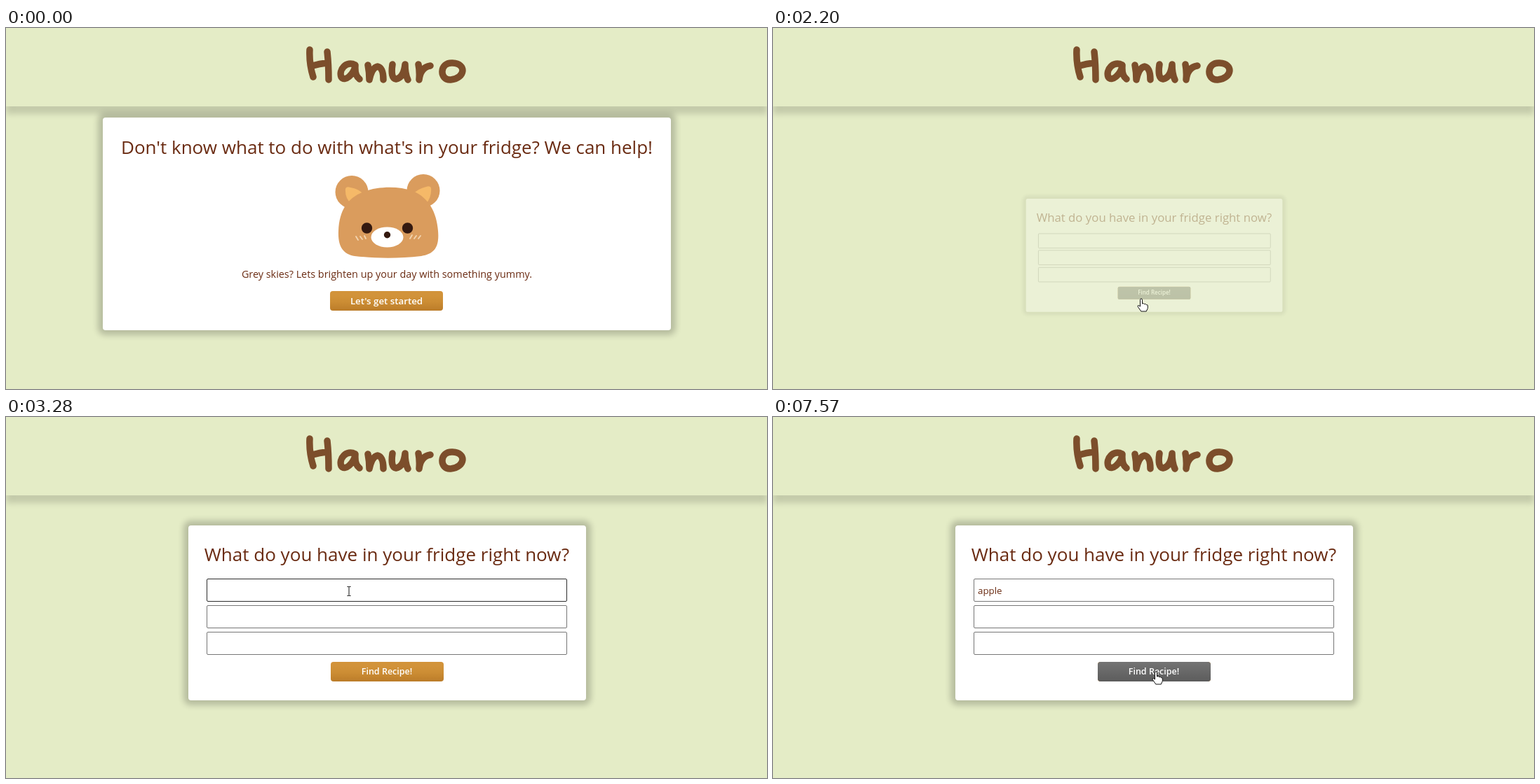
These frames come from a looping animation (1085 px wide and 516 px high, 8 s). An HTML page:

```html
<!DOCTYPE html>
<html lang="en">
<head>
<meta charset="utf-8">
<title>Hanuro</title>
<style>
html, body { margin: 0; width: 100%; height: 100%; overflow: hidden; background: #e4ecc6; }
body { position: relative; color: #6a2b12; font: 14.4px "Open Sans", sans-serif; }
header, .card, .card > *, svg { position: absolute; box-sizing: border-box; }
header { left: 0; top: 0; width: 1085px; height: 112px; background: #e4ecc6; box-shadow: 0 11px 8px rgba(0, 0, 0, .14); }
svg { left: 0; top: 0; overflow: visible; }
.card { background: #fff; border-radius: 4px; box-shadow: 0 0 9px 7px rgba(0, 0, 0, .2); transform-origin: 50% 100%; }
#intro { left: 138px; top: 128px; width: 810px; height: 304px; }
#form { left: 259.5px; top: 154.5px; width: 567px; height: 250.5px; }
.line { left: 0; right: 0; margin: 0; text-align: center; white-space: nowrap; line-height: 30px; }
h1 { font-size: 26px; font-weight: 400; }
.button {
  width: 161px; height: 28px; border-radius: 4px; overflow: hidden; isolation: isolate;
  background: linear-gradient(#d2933a 20%, #cc8d34 55%, #bb7c29);
  color: #fff; font-weight: 600; line-height: 28px; text-align: center; white-space: nowrap;
}
.button::before, .button::after { content: ""; position: absolute; inset: 0; z-index: -1; }
.button::before { background: linear-gradient(#747474, #5c5c5c); opacity: var(--hover); }
.button::after { background: #5d5d5d; opacity: var(--press); }
.field { left: 26.5px; width: 514px; height: 33px; border: 1px solid #767676; border-radius: 2px; }
.field.over { border-color: #2c2c2c; }
.field.focus { border: 2px solid #101010; border-radius: 3px; }
#typed { left: 32.5px; top: 83.5px; height: 20px; font-size: 13.3px; line-height: 21px; }
#caret { display: inline-block; width: 1px; height: 20px; margin-right: -1px; background: #6a2b12; vertical-align: top; }
#pointer path { display: none; stroke: #111; fill: #fff; stroke-linejoin: round; }
</style>
</head>
<body>
<header>
  <svg width="1085" height="112" fill="none" stroke="#7c4e2b" stroke-width="9.5" stroke-linecap="round" stroke-linejoin="round" role="img" aria-label="Hanuro">
    <path d="M433 31q-1 20 5 39M458 34q2 18 2 40M437 54q10-3 20-4
      M498 53C485 46 474 60 478 70C483 78 496 66 498 54q-1 14 6 19
      M516 53q2 10 2 21q4-18 12-19q8 2 8 19
      M551 52q-3 20 5 21q11-2 13-21q0 14 4 22
      M588 52q2 10 1 22q2-18 16-20
      M637 50C618 48 617 75 634 74C655 72 657 51 637 50"/>
  </svg>
</header>

<div class="card" id="intro">
  <h1 class="line" style="top:27px">Don't know what to do with what's in your fridge? We can help!</h1>
  <svg width="810" height="304" viewBox="138 128 810 304">
    <g fill="#da9c5d">
      <circle cx="493" cy="234.5" r="23.5"/>
      <circle cx="595" cy="232.5" r="23.5"/>
    </g>
    <path fill="#f5b968" d="M484 230q1-4 7-2q12 2 18 9l-17 14q-9-8-8-21M606 229q-1-4-7-2q-12 3-18 10l18 14q8-9 7-22"/>
    <path fill="#da9c5d" d="M474 290C475 262 486 243 510 234C532 226 560 226 580 233C604 243 614 265 616 290C618 313 611 323 592 326C560 329.5 529 329.5 497 326C481 323 473 313 474 290Z"/>
    <ellipse cx="543.5" cy="299" rx="23" ry="14.5" fill="#fff"/>
    <g fill="#341910">
      <circle cx="514.5" cy="286" r="7.7"/>
      <circle cx="572.5" cy="286" r="7.7"/>
      <circle cx="543.5" cy="295.7" r="4.7"/>
    </g>
    <path fill="none" stroke="#f3d5b0" stroke-width="1.8" stroke-linecap="round" d="M499 298l3 5M505 298l3 4M511 297l2 4M579 296l-3 5M585 297l-3 4M591 297l-3 4"/>
  </svg>
  <p class="line" style="top:208.5px">Grey skies? Lets brighten up your day with something yummy.</p>
  <div class="button" style="left:324px;top:248px;font-size:13.3px">Let's get started</div>
</div>

<div class="card" id="form">
  <h1 class="line" style="top:26.5px">What do you have in your fridge right now?</h1>
  <div class="field" id="first" style="top:76.5px"></div>
  <div class="field" style="top:114px"></div>
  <div class="field" style="top:152px"></div>
  <div id="typed"><span id="word"></span><span id="caret"></span></div>
  <div class="button" style="left:203px;top:195px;font-size:12.5px">Find Recipe!</div>
</div>

<svg width="1085" height="516" style="pointer-events:none">
  <g id="pointer">
    <path id="arrow" d="M0 0V16L4 12.5L6.5 18.5L9 17.5L6.5 11.5H12Z"/>
    <path id="hand" d="M-1.5 11V1.5a1.5 1.5 0 0 1 3 0V7q2.5-1 3 .7 2.3-.7 2.8.9 2-.4 2 1.4v3.5l-2 4.5h-7.5l-4.5-6.5q-.8-2.2 1-2z"/>
    <path id="beam" style="fill:none" d="M-2.5-6.5h2l.5.5.5-.5h2M0-6v12M-2.5 6.5h2l.5-.5.5.5h2"/>
  </g>
</svg>

<script>
const LOOP = 8000;
const $ = id => document.getElementById(id);
const ramp = (t, a, b) => Math.min(1, Math.max(0, (t - a) / (b - a)));
const smooth = p => p * p * (3 - 2 * p);

// time, x, y of the pointer's hot spot
const route = [
  [250, 845, 435], [390, 709, 383], [690, 709, 383], [1270, 525, 387], [2670, 525, 387],
  [3230, 489, 249], [6230, 489, 249], [6600, 543, 375], [6800, 546, 364], [LOOP, 546, 364]
];
const keys = [4150, 4340, 4470, 4930, 5140];
const caretOn = [[3490, 4010], [4150, 5670], [6150, 6670]];

function pointerAt(t) {
  const i = Math.max(1, route.findIndex(k => k[0] > t));
  const [a, b] = [route[i - 1], route[i]];
  const p = smooth(ramp(t, a[0], b[0]));
  return [a[1] + (b[1] - a[1]) * p, a[2] + (b[2] - a[2]) * p];
}

function pointerKind(t, x, y) {
  const overButton = x > 462 && x < 623;
  if (t < 2160) return overButton && y > 376 && y < 404 ? "hand" : "arrow";
  if (t < 2670 || overButton && y > 350 && y < 378) return "hand";
  const row = (y - 231) % 37.5;
  return y > 231 && y < 339 && row < 33 ? "beam" : "arrow";
}

function draw(t) {
  const root = document.documentElement.style;
  root.setProperty("--hover", ramp(t, 950, 1150) - ramp(t, 2780, 2960) + ramp(t, 6620, 6820));
  root.setProperty("--press", ramp(t, 1870, 1940) - ramp(t, 2130, 2300) + ramp(t, 7090, 7190) - ramp(t, 7360, 7560));

  const enter = 1 - (1 - ramp(t, 2160, 2660)) ** 4;
  $("intro").style.opacity = 1 - ramp(t, 2090, 2200);
  $("form").style.opacity = enter;
  $("form").style.transform = `scale(${0.5 + enter / 2})`;

  const [x, y] = pointerAt(t);
  const kind = pointerKind(t, x, y);
  $("pointer").setAttribute("transform", `translate(${x} ${y})`);
  for (const id of ["arrow", "hand", "beam"])
    $(id).style.display = t >= 250 && id === kind ? "inline" : "none";

  $("first").classList.toggle("over", t > 2670 && y > 231 && y < 264);
  $("first").classList.toggle("focus", t >= 3490 && t < 7090);
  $("word").textContent = "apple".slice(0, keys.filter(k => t >= k).length);
  $("caret").style.visibility = caretOn.some(([a, b]) => t >= a && t < b) ? "inherit" : "hidden";
}

function tick() {
  draw(performance.now() % LOOP);
  requestAnimationFrame(tick);
}
tick();
</script>
</body>
</html>
```
